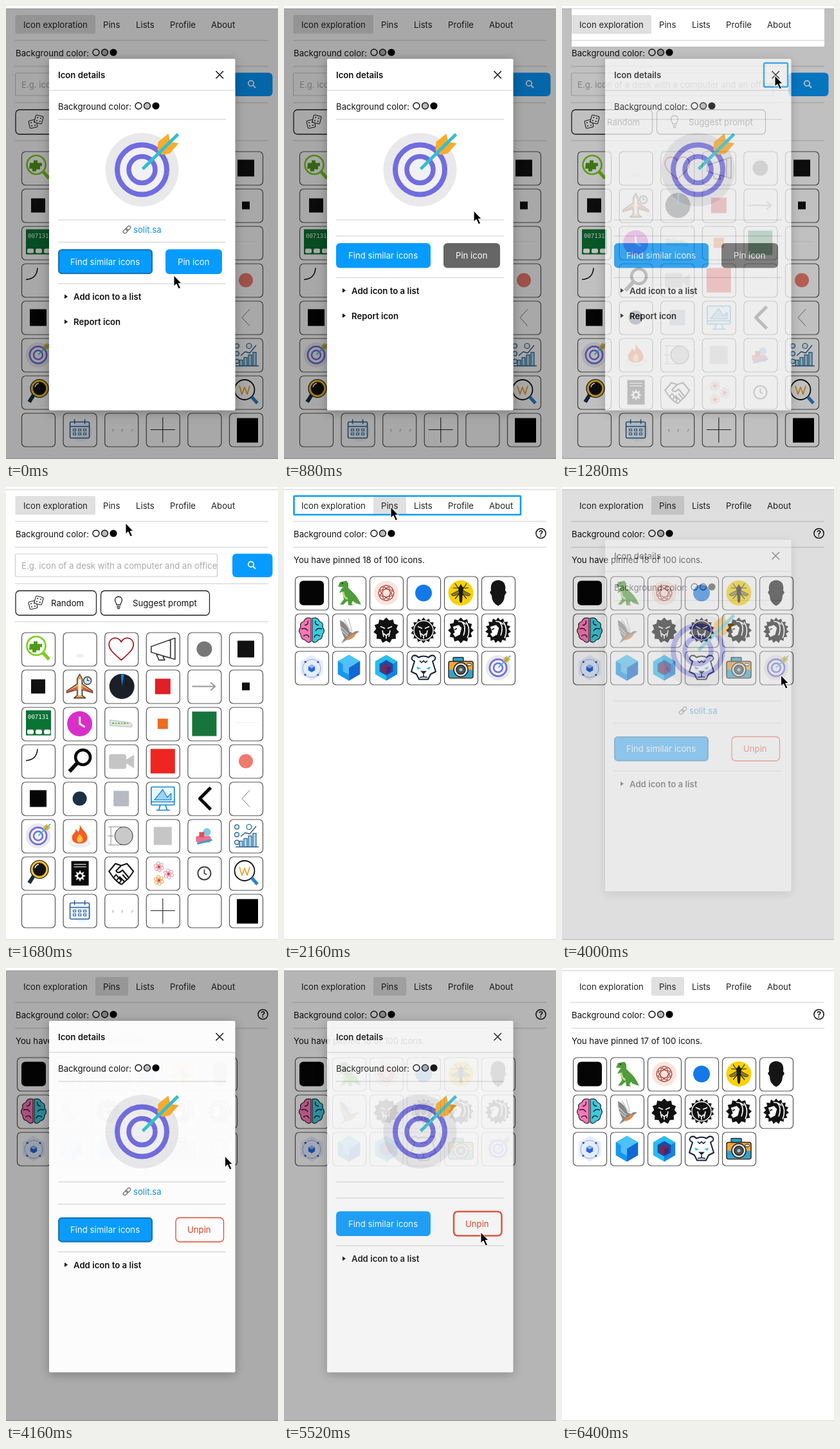
An HTML page that plays this animation: 423x703 px, repeating every 6560 ms.

```html
<!DOCTYPE html>
<html lang="en">
<head>
<meta charset="utf-8">
<style>
html, body { margin: 0; width: 100%; height: 100%; overflow: hidden; background: #fff }
svg { display: block }
text { font: 13.2px Inter, sans-serif; fill: #111 }
.b { font-weight: 600 }
</style>
</head>
<body>
<script>
const LOOP = 6560, BLUE = '#069bff', INK = '#222';

// Shape helpers
const P = (d, f = 'none', s = 'none', w = 2) =>
  `<path d="${d}" fill="${f}" stroke="${s}" stroke-width="${w}" stroke-linejoin="round"/>`;
const C = (x, y, r, f = 'none', s = 'none', w = 2) =>
  `<circle cx="${x}" cy="${y}" r="${r}" fill="${f}" stroke="${s}" stroke-width="${w}"/>`;
const R = (x, y, w, h, f = 'none', r = 0, s = 'none', sw = 1.3) =>
  `<rect x="${x}" y="${y}" width="${w}" height="${h}" rx="${r}" fill="${f}" stroke="${s}" stroke-width="${sw}"/>`;
const E = (x, y, a, b, turn, s, w = 1) =>
  `<ellipse rx="${a}" ry="${b}" transform="translate(${x} ${y}) rotate(${turn})" fill="none" stroke="${s}" stroke-width="${w}"/>`;
const T = (x, y, s, extra = '') => `<text x="${x}" y="${y}" ${extra}>${s}</text>`;
const G = (move, s, id = '') => `<g id="${id}" transform="${move}">${s}</g>`;
const at = (x, y, s, id) => G(`translate(${x} ${y})`, s, id);
const rule = (y, x0 = 14, x1 = 408) => P(`M${x0} ${y}H${x1}`, 'none', '#dcdcdc', 1.6);
const square = (f, n = 24) => R(26 - n / 2, 26 - n / 2, n, n, f);
const dot = (f, n = 12) => C(26, 26, n, f);
const many = (n, fn) => Array.from({ length: n }, (_, i) => fn(i)).join('');
const star = (n, out, inn, x = 26, y = 26) => 'M' + many(2 * n, i => {
  const r = i % 2 ? inn : out, a = i * Math.PI / n - Math.PI / 2;
  return ` ${(x + r * Math.cos(a)).toFixed(1)} ${(y + r * Math.sin(a)).toFixed(1)}`;
}) + 'Z';
const hexagon = (r, f) => P(star(3, r, r), f);
const swatches = (x, y) =>
  T(x, y + 5.5, 'Background color:') +
  C(x + 125, y, 5, '#fff', '#111', 1.4) + C(x + 138.5, y, 5, '#bbb', '#111', 1.4) + C(x + 152, y, 5.6, '#000');

const target = C(0, 0, 57, '#e9e9eb') + C(0, 0, 38.5, '#f1f1f4', '#716ce0', 8) +
  C(0, 0, 20.5, '#f1f1f4', '#716ce0', 7.5) +
  P('M24-30L25-43L41-56L44-43L57-41L43-25L31-23Z', '#fbab2c') +
  P('M1-1L56-55', 'none', '#30c0d0', 5);
const mini = G('translate(26 26) scale(.34)', target);

const atom = (x, y, s) => many(3, i => E(x, y, 8, 3, i * 60 + 20, s)) + C(x, y, 2.2, '#e0355f');

const icons = [
  // row 1
  C(23, 21, 14.5, '#fff', '#78cf1a', 2.6) + P('M34 32L43 42', 'none', '#78cf1a', 5) +
    P('M13 18h6v-4h6v4h7v5h-3v5h-6v3h-6v-4h-5Z', '#4f9b16'),
  R(21, 34, 11, 5, '#eee'),
  P('M26 43C13 32 7 26 7 19C7 8 21 5 26 15C31 5 45 8 45 19C45 26 39 32 26 43Z', 'none', '#a51a20', 1.8),
  P('M8 22L45 9V42L8 31ZM38 12V39M16 34L20 43H29L26 37', 'none', '#444', 1.8),
  dot('#777'), square('#111', 26),
  // row 2
  square('#111', 22),
  P('M26 7L30 14V22L46 33V36L30 31V40L35 44H17L22 40V31L6 36V33L22 22V14Z', '#f2a355', '#333', 1.3) +
    P('M24 15H28V40H24Z', '#fff') + C(38, 17, 6, '#cfe3f5', '#333', 1.4) + P('M38 13V17H41', 'none', '#333', 1.2) +
    P('M6 35L22 28M46 35L30 28', 'none', '#d34a32', 2),
  C(27, 26, 19.5, '#1b2028') + P('M27 26L25.5 7H30.5Z', '#0b83d8'),
  square('#e01f26', 24),
  P('M7 26H43M36 20L43 26L36 32', 'none', '#999', 2),
  square('#111', 12),
  // row 3
  R(7, 5, 39, 39, '#0b7334', 1) + T(10, 18, '007131', 'style="font:9px DejaVu Sans Mono,monospace;fill:#fff"') +
    many(3, i => R(9 + i * 13, 35, 10, 7, '#fff', 2)),
  C(26, 26, 19.5, '#d92fc8') + P('M26 15V26L34 31', 'none', '#fff', 3),
  P('M8 20L40 24Q45 29 42 31L9 29Z', '#d9ebdf', '#aab', .8) + many(6, i => R(12 + i * 4.5, 24, 2.5, 2.5, i % 2 ? '#e5a23c' : '#62aa83')),
  square('#f06a20', 16), square('#16753a', 38),
  P('M8 24H44', 'none', '#eee', 1),
  // row 4
  P('M25 7Q24 24 7 25', 'none', '#111', 1.6),
  C(31, 20, 11.5, 'none', '#050505', 4.5) + P('M23 28L10 42', 'none', '#050505', 6),
  R(7, 15, 27, 23, '#c5c5c5', 4) + P('M33 24L46 16V37L33 29Z', '#c5c5c5'),
  square('#ee2521', 38), '', dot('#ef7b6e', 11),
  // row 5
  square('#050505', 26), dot('#1b3047', 11), square('#b6bac2', 24),
  R(8, 8, 36, 28, '#e8f6ff', 2, '#1384cf', 1.6) + P('M8 31H44M22 36L20 44H33L30 36M16 44H37', 'none', '#1384cf', 1.6) +
    P('M13 28L26 12L33 24L39 18V28Z', '#9bd4f5', '#1384cf', 1.2),
  P('M36 9L19 26L36 43', 'none', '#050505', 5),
  P('M32 13L20 26L32 39', 'none', '#777', 1),
  // row 6
  mini,
  E(26, 37, 15, 5, 0, '#eee', 4) + P('M26 8C29 17 38 20 38 29C38 41 14 41 14 29C14 22 19 23 20 16Q24 18 23 21Q27 16 26 8Z', '#f45b27') +
    P('M26 23C32 30 33 35 26 36C19 35 21 29 26 23Z', '#ffc04a'),
  C(30, 26, 14, '#c9c9c9', '#333', 1) + P('M10 12V40M6 12H30M6 40H30M5 26H14', 'none', '#777', .8),
  square('#c6c6c6', 28),
  R(13, 26, 23, 10, '#ef6f8e', 3) + C(30, 20, 6, '#7fc9ea') + P('M15 38L38 32', 'none', '#3aa0c8', 3) + R(18, 20, 8, 8, '#e04f55'),
  many(4, i => R(16 + i * 7, 34 - i * 4, 5, 9 + i * 4, '#a9d8ee', 0, '#28608b', 1.2)) +
    many(3, i => C(12, 12 + i * 12, 3.4, '#d4ecf6', '#28608b', 1.2)) +
    P('M18 27L25 21L32 23L42 11M10 43H46', 'none', '#28608b', 1.4) + C(31, 12, 4, '#e6f4fa', '#28608b', 1.2),
  // row 7
  C(28, 20, 12, '#111', '#f1bd2b', 3.5) + C(28, 20, 14, 'none', '#111', 1.2) + P('M19 30L12 41', 'none', '#172d45', 6) + P('M21 18Q22 13 27 12', 'none', '#fff', 1.5),
  R(13, 7, 27, 38, '#080808') + P('M17 12H36M17 16H36', 'none', '#fff', 1.2) + P(star(8, 9, 5, 26.5, 30), '#fff') + C(26.5, 30, 3, '#080808'),
  P('M7 23L17 11L26 14L35 11L45 23L38 33L27 43Q23 43 14 33ZM26 14L18 22Q21 28 28 21L38 33M23 31L31 39M28 28L35 36M14 33L18 28L22 33L18 38M22 33L26 37L23 41', '#fff', '#111', 2),
  atom(20, 16, '#e6a0aa') + atom(35, 27, '#dfa5b5') + atom(20, 37, '#e8b15c'),
  C(26, 26, 10, '#fff', '#444', 2) + P('M26 20V26L30 28', 'none', '#444', 1.8),
  C(24, 22, 15.5, '#fff', '#111', 1.8) + P('M35 33L44 43', 'none', '#2c83c9', 5) + P('M16 16L20 29L24 18L28 29L32 16', 'none', '#eda32c', 1.8),
  // row 8
  '',
  C(29, 28, 16, '#e9f3fb') + R(11, 14, 30, 25, 'none', 2, '#2c5f95', 1.6) + P('M11 21H41M18 10V17M34 10V17', 'none', '#2c5f95', 1.6) +
    many(6, i => R(16 + i % 3 * 8, 25 + (i > 2) * 6, 4, 3, 'none', 0, '#2c5f95', 1)),
  P('M13 25V29M28 25L27 29M44 25L42 29', 'none', '#999', 1),
  P('M26 7V46M7 26H45', 'none', '#222', 1.1),
  '', R(12, 8, 33, 38, '#000'),
];

const front = C(26, 26, 11, '#111') + P('M17 20L24 23M35 20L28 23M22 31L26 34L30 31M26 34V39M20 26L22 36M32 26L30 36', 'none', '#fff', 1.6);
const profile = P('M13 20L23 17L28 22L25 33L17 37L13 31L16 29Z', '#fff', '#111', 1.2) +
  P('M16 23L21 23M15 32H20M28 13Q35 20 30 34M34 13Q42 24 36 38M22 12Q30 12 34 17', 'none', '#fff', 1.6) + P('M16 25L20 23', 'none', '#111', 1.6);
const lion = (n, face) => P(star(n, 20, 16), '#111') + face;

const pins = [
  R(7, 7, 38, 38, '#050505', 6),
  P('M12 9L22 7L25 11V18L32 25Q39 31 45 44Q34 42 32 38L30 43L33 45H25L24 38L17 44H12L18 36L16 24L11 26L14 20L17 17L9 16Z', '#4f9d3a') +
    P('M17 24Q18 34 24 35', 'none', '#b9d77c', 3) + C(16, 11, 1, '#111'),
  C(26, 26, 19, '#fae5dc') + many(4, i => E(26, 26, 12, 6, i * 45, '#a8443f')) + C(26, 26, 12, 'none', '#a8443f', 1),
  dot('#1479e8', 13),
  C(26, 26, 19.5, '#f8d203') + many(2, i => G(`translate(26 0) scale(${i ? -1 : 1} 1)`,
    P('M0 20L15 28Q13 34 2 26Z', '#8d7c18', '#222', .8) + P('M0 20L6 16L9 11M0 24L9 35M0 19L12 18', 'none', '#222', 1.2))) + P('M26 12L30 19L29 26L28 39L26 42L24 39L23 26L22 19Z', '#1b1b12'),
  P('M15 22Q13 7 26 6Q39 7 37 22L39 25L36 30Q36 41 26 46Q16 41 16 30L13 25Z', '#151515'),
  P('M25 7Q16 5 14 12Q7 14 9 21Q4 27 9 32Q9 40 16 41Q20 47 25 43Z', '#ff76b8', '#222', 1.2) +
    P('M27 7Q36 5 38 12Q45 14 43 21Q48 27 43 32Q43 40 36 41Q32 47 27 43Z', '#3ccbe0', '#222', 1.2) +
    P('M20 11Q22 17 15 18M10 24Q17 21 20 27M13 35Q20 30 22 37M32 11Q30 17 37 18M42 24Q35 21 32 27M39 35Q32 30 30 37', 'none', '#222', 1.4),
  P('M12 10Q23 15 27 28L32 30Q37 25 42 28L37 31Q33 40 22 41L14 46L19 38Q12 25 12 10Z', '#888') +
    P('M18 9L29 28M25 7L31 28M12 19L25 32M13 25L24 35', 'none', '#ccc', 1.6) + P('M20 41L32 31L37 31Q32 41 20 41Z', '#e88a43'),
  lion(11, front), lion(14, front + C(26, 26, 15, 'none', '#fff', 1.4)), lion(12, profile),
  lion(15, G('translate(52) scale(-1 1)', G('translate(52) scale(-1 1)', profile))),
  hexagon(20, '#e5edfc') + C(26, 27, 14, 'none', '#91aadf', 1) + many(4, i => C(26 + 14 * Math.cos(i * 1.57 + .8), 27 + 14 * Math.sin(i * 1.57 + .8), 1.6, '#315bb2')) +
    P(star(3, 6, 6, 26, 27), '#2765d8') + P('M26 21L31 24L26 27L21 24Z', '#8db8ff'),
  hexagon(20, '#1583e5') + P('M26 6L43 16L26 26L9 16Z', '#48c5fa') + P('M9 16L26 26V46L9 36Z', '#1598ef') + P(star(3, 11, 11), '#55bdf8') + P('M26 26V46L43 36V16Z', '#1269d3'),
  hexagon(20, '#26bdf0') + P('M26 26V46L43 36V16Z', '#1684e0') + hexagon(12, '#1b4ca4') + P('M26 20L33 24V32L26 36L19 32V24Z', '#7b2750') + P('M26 26V36L33 32V24Z', '#41267f'),
  P('M12 16Q5 13 9 8Q14 5 18 10Q26 6 34 10Q38 5 43 8Q47 13 40 16L45 32L37 36L33 44H19L15 36L7 32Z', '#fff', '#162137', 2) +
    P('M15 24L22 27L17 29ZM37 24L30 27L35 29Z', '#35b9e8') + P('M21 31H31L26 36Z', '#162137') + P('M26 36V40L20 41M26 40L32 41M20 15L23 18L26 15L29 18L32 15', 'none', '#162137', 1.6),
  R(7, 16, 38, 26, '#f7a534', 3, '#222', 1.5) + R(8, 29, 36, 12, '#27a6d5', 2) + R(14, 10, 16, 6, '#27a6d5', 1, '#222', 1.4) +
    C(26, 29, 11, '#e5e5df', '#222', 1.5) + C(26, 29, 7, '#4c555b', '#222', 1.5) + C(26, 29, 2.5, '#b5c2c9') + R(36, 19, 6, 4, '#fff', 1, '#222', 1),
  mini,
];

const cell = (x, y, s, id) => at(x, y, R(.5, .5, 52, 52, '#fff', 6, '#555', 1.2) + s, id);
const lens = (x, y, s) => C(x - 1, y - 1, 4.2, 'none', s, 1.8) + P(`M${x + 2} ${y + 2}l4 4`, 'none', s, 2);
const die = (x, y, turn) => G(`translate(${x} ${y}) rotate(${turn})`,
  R(-6, -6, 12, 12, '#fff', 2, INK, 1.1) + many(4, i => C(i % 2 * 5 - 2.5, (i > 1) * 5 - 2.5, 1, INK)));

const explore = rule(150) + rule(209) +
  R(14.5, 104, 314, 35, '#fff', 2, '#ccc', 1.2) +
  `<svg x="15" y="104" width="313" height="35">${T(9, 23, 'E.g. icon of a desk with a computer and an office', 'style="fill:#aaa"')}</svg>` +
  R(352, 103.5, 62.5, 36.5, BLUE, 6) + lens(382, 121, '#fff') +
  R(15, 161, 125.5, 38, '#fff', 6, INK) + die(42, 183, -12) + die(51, 176, 15) + T(70, 185, 'Random') +
  R(147.5, 161, 169, 38, '#fff', 6, INK) +
  P('M172 183Q172 181 170 178Q168 171 175 170Q182 171 180 178Q178 181 178 183ZM172 186H178M173 188.5H177', 'none', INK, 1.3) +
  T(197, 185, 'Suggest prompt') +
  icons.map((s, i) => cell(24 + i % 6 * 64.6, 225.5 + (i / 6 | 0) * 58, s)).join('');

const pinned = T(15, 118, '', 'id="count"') + C(399.5, 72, 7.6, '#fff', '#111', 1.5) +
  T(399.5, 76.5, '?', 'class="b" text-anchor="middle"') +
  pins.map((s, i) => cell(17 + i % 6 * 58, 138.5 + (i / 6 | 0) * 58, s, 'pin' + i)).join('') +
  `<g id="glow" style="filter:drop-shadow(0 0 3px ${BLUE})">${R(307.5, 255, 52, 52, 'none', 6, BLUE, 1.6)}</g>` +
  `<g id="navFocus">${R(15.5, 14, 352.5, 29, 'none', 1, '#0a9cf0', 2.6)}</g>`;

const details = (y, s) => P(`M91 ${y - 3.5}L96 ${y}L91 ${y + 3.5}Z`, '#111') + T(105, y + 5, s, 'class="b"');
const modal = `<g style="filter:drop-shadow(0 3px 8px #0004)">${R(67, 82, 289.5, 545.5, '#fff', 2)}</g>` +
  T(81, 111.5, 'Icon details', 'class="b"') + P('M326.5 101L338 112.5M338 101L326.5 112.5', 'none', '#111', 1.5) +
  `<g id="xFocus">${R(314, 88.5, 37, 37, 'none', 2, '#1da1ee', 2.4)}</g>` +
  rule(131, 67, 356.5) + swatches(81, 155) + rule(176, 81, 342) +
  at(211.5, 254, target) + rule(332, 81, 342) +
  `<g id="link">${G('translate(188 347) rotate(-45)', R(-7, -2.4, 8, 4.8, 'none', 2.4, '#777', 1.4) + R(-1, -2.4, 8, 4.8, 'none', 2.4, '#777', 1.4))}
  ${T(198, 352, 'solit.sa', 'style="fill:#0a8fe6"')}</g>` +
  at(0, 0, rule(366.5, 81, 342), 'lower') +
  at(0, 0, R(81, 377.5, 147, 38.5, BLUE, 6) +
    `<g id="findFocus">${R(82, 378.5, 145, 36.5, 'none', 5, '#1670b2', 2)}</g>` +
    T(100, 401.5, 'Find similar icons', 'style="fill:#fff"') +
    `<g id="pinBtn">${R(248, 377.5, 88, 38.5, 'currentColor', 6)}${T(267, 401.5, 'Pin icon', 'style="fill:#fff"')}</g>` +
    `<g id="unpinBtn">${R(264, 378, 74.5, 37.5, '#fff', 6, '#e2492b', 'inherit')}${T(282, 401.5, 'Unpin', 'style="fill:#d33a1c"')}</g>` +
    rule(431, 81, 342) + details(451, 'Add icon to a list') + `<g id="report">${details(490, 'Report icon')}</g>`, 'actions');

const tabs = [[27, 'Icon exploration'], [151, 'Pins'], [202, 'Lists'], [255, 'Profile'], [319, 'About']];
document.body.innerHTML = `<svg width="423" height="703" viewBox="0 0 423 703">` +
  R(0, 0, 423, 703, '#fff') + rule(4, 0, 423) + rule(702.5, 0, 423) +
  `<rect id="tab" y="14" height="29" rx="2" fill="#e0e0e0"/>` +
  tabs.map(([x, s]) => T(x, 33.5, s, 'style="fill:#222"')).join('') +
  rule(53.5) + swatches(15, 72) + rule(93.5) +
  `<g id="explore">${explore}</g><g id="pinned">${pinned}</g>` +
  `<path id="dim" fill-rule="evenodd"/><g id="modal">${modal}</g>` +
  at(0, 0, P('M0 0V17L4 13.5L7.5 21L10.5 19.5L7.2 12.6H12Z', '#000', '#fff', 1), 'cursor') + '</svg>';

const $ = id => document.getElementById(id);
const show = (id, on) => $(id).style.display = on ? '' : 'none';
const move = (id, x, y) => $(id).setAttribute('transform', `translate(${x} ${y})`);
const ramp = (t, a, b) => Math.min(1, Math.max(0, (t - a) / (b - a)));

const path = [[80, 261, 418], [440, 281, 400], [720, 281, 400], [1180, 331, 108], [1360, 331, 108], [1680, 186, 56],
  [1800, 166, 31], [2400, 166, 31], [3020, 340, 292], [4240, 340.5, 292], [4600, 322, 335], [5020, 306, 410]];
function pointer(t) {
  const i = path.findIndex(k => k[0] > t);
  if (i < 1) return path.at(i).slice(1);
  const [a, x, y] = path[i - 1], [b, u, v] = path[i], k = ramp(t, a, b), e = k * k * (3 - 2 * k);
  return [x + (u - x) * e, y + (v - y) * e];
}

function draw(t) {
  const onPins = t >= 1840, removed = t >= 5760;
  const open = t < 2500 ? 1 - ramp(t, 1200, 1500) : ramp(t, 3900, 4168) - ramp(t, 5480, 5760);
  const linked = t < 760 || t > 2500 && t < 5440;

  show('explore', !onPins);
  show('pinned', onPins);
  $('tab').setAttribute('x', onPins ? 139 : 14.5);
  $('tab').setAttribute('width', onPins ? 51 : 124.5);
  $('count').textContent = `You have pinned ${removed ? 17 : 18} of 100 icons.`;
  show('pin17', !removed);
  show('navFocus', t < 3900);
  $('glow').style.opacity = t < 3900 ? ramp(t, 2900, 3040) : 0;

  const hole = t >= 1240 && t < 1500 ? 'M15 4H408V63H15Z' : '';
  $('dim').setAttribute('d', 'M0 4H423V703H0Z' + hole);
  $('dim').style.opacity = .34 * open;
  $('modal').style.opacity = open;
  show('modal', open > 0);

  const lift = linked ? 0 : -9.5;
  show('link', linked);
  move('lower', 0, lift);
  move('actions', 0, lift + (onPins ? 9.5 : 0));
  show('findFocus', t < 720 || t > 2500 && t < 5400);
  show('xFocus', t >= 1180 && t < 2500);
  show('pinBtn', !onPins);
  $('pinBtn').style.color = t < 720 ? BLUE : '#666';
  show('unpinBtn', onPins);
  $('unpinBtn').querySelector('rect').style.strokeWidth = t < 4960 ? 1.3 : 2.5;
  show('report', !onPins);

  move('cursor', ...pointer(t));
  show('cursor', t < 6240);
}

const start = performance.now();
function frame() {
  draw((performance.now() - start) % LOOP);
  requestAnimationFrame(frame);
}
draw(0);
requestAnimationFrame(frame);
</script>
</body>
</html>
```
